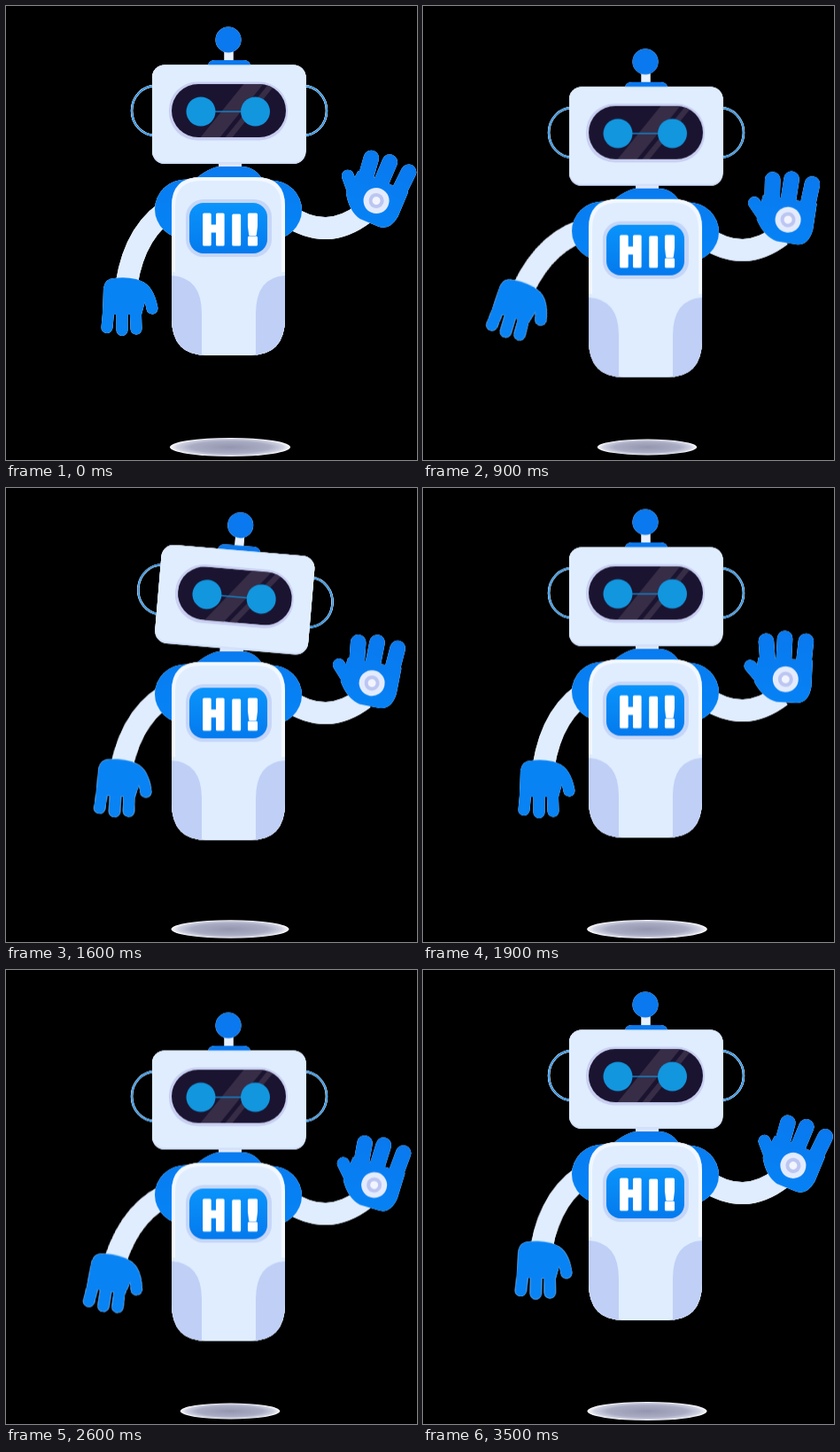
Write an HTML page that moves like this. It is 464 px wide and 512 px high and loops after 3.6 s.

```html
<!DOCTYPE html>
<html lang="en">
<head>
<meta charset="utf-8">
<title>Waving robot</title>
<style>
  html, body { margin: 0; width: 100%; height: 100%; overflow: hidden; background: #000; }
  svg { display: block; width: 100vw; height: 100vh; }
  #robot { filter: drop-shadow(0 0 .6px #fff); }
  .limb { fill: none; stroke: #e0edff; stroke-width: 25; }
  .fingers { fill: none; stroke: url(#blue); stroke-linecap: round; stroke-linejoin: round; }
  .blue { fill: url(#blue); }
  .skin { fill: #dfedff; }
</style>
</head>
<body>
<svg viewBox="0 0 464 512">
  <defs>
    <linearGradient id="blue" gradientUnits="userSpaceOnUse" x1="0" y1="150" x2="0" y2="380">
      <stop offset="0" stop-color="#0a78ee"/>
      <stop offset=".4" stop-color="#0682f5"/>
      <stop offset="1" stop-color="#0a84f4"/>
    </linearGradient>
    <linearGradient id="screen" x2="0" y2="1">
      <stop offset="0" stop-color="#0a94fb"/>
      <stop offset="1" stop-color="#047aee"/>
    </linearGradient>
    <radialGradient id="shade">
      <stop offset="0" stop-color="#9396ae"/>
      <stop offset=".65" stop-color="#a9acc3"/>
      <stop offset=".88" stop-color="#d0d2e2"/>
      <stop offset="1" stop-color="#fff"/>
    </radialGradient>
    <clipPath id="torso">
      <path d="M187 225Q187 193 220 193H282Q315 193 315 225V352Q315 394 275 394H227Q187 394 187 352Z"/>
    </clipPath>
    <clipPath id="visor"><rect x="187" y="88" width="129" height="60" rx="30"/></clipPath>
  </defs>
  <rect width="464" height="512"/>
  <ellipse id="shadow" cx="253" cy="497.5" fill="url(#shade)"/>

  <g id="robot">
    <g id="leftArm">
      <path class="limb" d="M190 226Q146 250 136 314"/>
      <path class="blue" d="M110 318Q112 307 122 307Q134 305 147 308Q159 311 159 326L153 348H109Z"/>
      <path class="fingers" stroke-width="13" d="M117 330L114 362.500M131 335V365.500M146 335L147 364M150 316Q161 320 165 341"/>
    </g>

    <path class="limb" d="M318 236Q362 266 404 234"/>
    <g id="rightHand">
      <path class="blue" d="M376 192H437.500V222Q435 241 421 241H399Q384 238 373 220Z"/>
      <path class="fingers" stroke-width="17.500" d="M388 205L384 173M405 205V169M427 205L429 171"/>
      <path class="fingers" stroke-width="14" d="M388 224L367.500 202"/>
      <circle cx="408" cy="215" r="14.500" fill="#e3ebfd"/>
      <circle cx="408" cy="215" r="6.500" fill="#f2f5ff" stroke="#bcc6f2" stroke-width="4"/>
    </g>

    <g id="head">
      <g fill="none">
        <g stroke="#e8f3ff" stroke-width="2.400">
          <ellipse cx="168.500" cy="118" rx="26.500" ry="28"/>
          <ellipse cx="335.500" cy="118" rx="26.500" ry="28"/>
        </g>
        <g stroke="#168bea" stroke-width="1.500">
          <ellipse cx="168.500" cy="118" rx="26.500" ry="28"/>
          <ellipse cx="335.500" cy="118" rx="26.500" ry="28"/>
        </g>
      </g>
      <rect x="246.500" y="50" width="10" height="14" fill="#e8f1ff"/>
      <circle class="blue" cx="251" cy="38" r="14.500"/>
      <path class="blue" d="M228 70V66Q230 61 236 61H268Q274 61 276 66V70Z"/>
      <rect x="240" y="174" width="26" height="18" fill="#dfe5fb"/>
      <rect x="165" y="66.500" width="173.500" height="111.500" rx="14" fill="#d2e0fa"/>
      <rect class="skin" x="165" y="66.500" width="173.500" height="109.500" rx="14"/>
      <rect x="184" y="85.500" width="134" height="66" rx="32" fill="#c8cff1"/>
      <g clip-path="url(#visor)">
        <rect x="187" y="88" width="129" height="60" fill="#1b1430"/>
        <path d="M270 86H292L240 150H218ZM298 86H306L254 150H246Z" fill="#40364f" opacity=".75"/>
      </g>
      <path d="M220 119H282" stroke="#1680c4" stroke-width="1.600"/>
      <g fill="#1296de">
        <circle cx="220" cy="119" r="16.500"/>
        <circle cx="281.500" cy="119" r="16.500"/>
      </g>
    </g>

    <path class="blue" d="M210 198Q230 181 242 181H266Q282 181 291 198Z"/>
    <ellipse class="blue" cx="203" cy="229" rx="35" ry="33.500"/>
    <ellipse class="blue" cx="299" cy="230" rx="35" ry="33.500"/>
    <g clip-path="url(#torso)">
      <rect class="skin" x="187" y="193" width="128" height="201"/>
      <path d="M189 300V226Q189 195 221 195H281Q313 195 313 226V300" fill="none" stroke="#f3f8ff" stroke-width="4"/>
      <path d="M187 304Q221 306 221 347V394H187ZM315 304Q282 306 282 347V394H315Z" fill="#c0cff6"/>
    </g>
    <rect x="203" y="218" width="97" height="65" rx="20" fill="#c6d6f8"/>
    <rect x="207" y="222" width="88" height="57" rx="16" fill="url(#screen)"/>
    <text y="268.500" fill="#fff" stroke="#fff" stroke-width="3" stroke-linejoin="round" font-weight="700" font-size="46"><tspan x="220.500" font-family="'DejaVu Sans Mono', monospace">H</tspan><tspan x="253.500" font-size="48" font-family="'Liberation Sans', sans-serif">I</tspan><tspan x="268" font-family="'DejaVu Sans', sans-serif">!</tspan></text>
  </g>
</svg>
<script>
  const LOOP = 3600, HALF = 1800, STEP = 100;
  const [robot, head, leftArm, rightHand, shadow] =
    ['robot', 'head', 'leftArm', 'rightHand', 'shadow'].map(id => document.getElementById(id));

  // Smooth 0 → 1 between times a and b.
  const ease = (t, a, b) => (1 - Math.cos(Math.PI * Math.min(1, Math.max(0, (t - a) / (b - a))))) / 2;
  const turn = (el, angle, x, y) => el.setAttribute('transform', `rotate(${angle} ${x} ${y})`);

  function sink(t) {
    const u = (t - 30 + HALF) % HALF;
    return ease(u, 0, 830) - ease(u, 830, HALF);
  }

  function tilt(t) {
    if (t >= HALF) return 0;
    const s = Math.sin(2 * Math.PI * t / HALF);
    return -s * (s > 0 ? 8.5 : 7.6);
  }

  const swing = t => 17 * (
    ease(t, 430, 950) - ease(t, 950, 1880) +
    ease(t, 2350, 2835) - ease(t, 2835, 3660));

  function wave(t) {
    const p = t / 510 % 1;
    return 23 * (1 - ease(p, .02, .25) + ease(p, .68, .88));
  }

  function draw(t) {
    const low = sink(t);
    robot.setAttribute('transform', `translate(0 ${24.8 * low})`);
    turn(head, tilt(t), 250, 199);
    turn(leftArm, swing(t), 190, 225);
    turn(rightHand, wave(t), 402, 242);
    shadow.setAttribute('rx', 68 - 12 * low);
    shadow.setAttribute('ry', 10.5 - 1.5 * low);
  }

  const start = performance.now();
  function tick() {
    const t = (performance.now() - start) % LOOP;
    draw(Math.floor(t / STEP) * STEP);
    requestAnimationFrame(tick);
  }
  tick();
</script>
</body>
</html>
```
